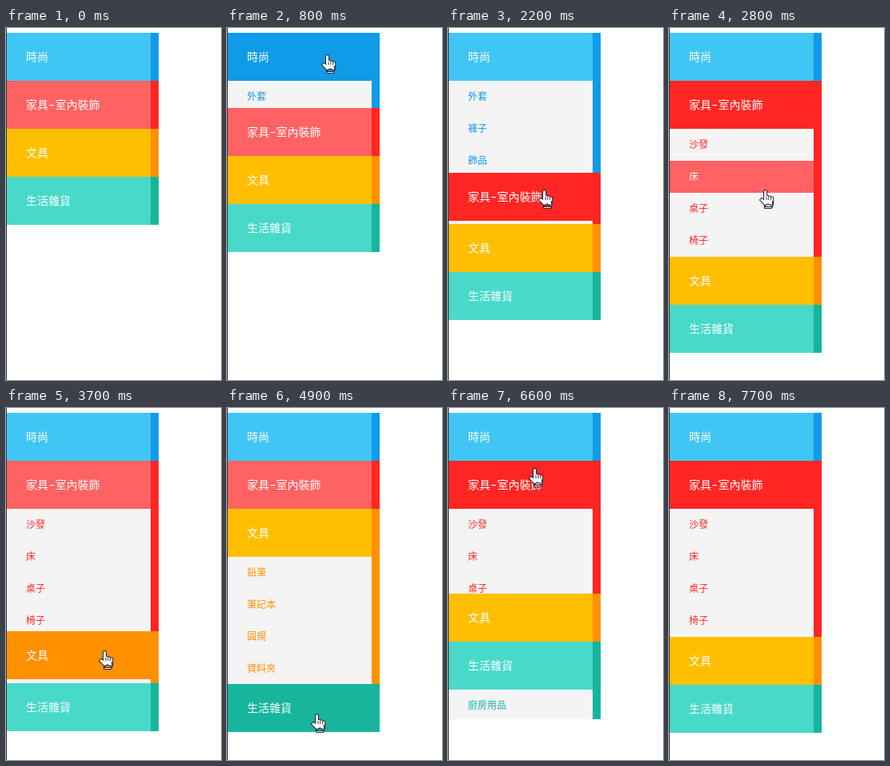
An HTML page with a canvas for the animation above (8300 ms loop, 269x440 px).

```html
<!DOCTYPE html>
<html lang="zh-Hant">
<head>
<meta charset="utf-8">
<title>Accordion menu</title>
<style>
  html, body { margin: 0; width: 100%; height: 100%; overflow: hidden; background: #fff; }
  canvas { display: block; }
</style>
</head>
<body>
<canvas id="stage" width="269" height="440"></canvas>
<script>
const ctx = document.getElementById('stage').getContext('2d');
const LOOP = 8300, STEP = 100, SLIDE = 400, TRAVEL = 500, OPEN_DELAY = 8;
const LEFT = 1, RIGHT = 191, STRIPE = 181, TOP = 6, HEAD = 60, ROW = 40;
const CJK = '"Noto Sans CJK TC", "Noto Sans CJK", sans-serif';
const HEAD_FONT = '300 14px "Noto Sans Mono", ' + CJK;
const ITEM_FONT = '300 12px "Noto Sans", ' + CJK;

const groups = [
  { title: '時尚', light: '#40c6f4', dark: '#0f9be8', items: ['外套', '褲子', '飾品'] },
  { title: '家具–室內裝飾', light: '#ff6262', dark: '#ff2623', items: ['沙發', '床', '桌子', '椅子'] },
  { title: '文具', light: '#ffbf00', dark: '#ff9000', items: ['鉛筆', '筆記本', '圓規', '資料夾'] },
  { title: '生活雜貨', light: '#48d9c8', dark: '#17b59c', items: ['廚房用品', '掃除˙洗滌用品', '浴室˙廁所用品'] }
];

// Where the pointer arrives, and which group it then clicks open.
const stops = [
  { at: 0, x: 290, y: 29 },
  { at: 500, x: 118, y: 33, click: 650, opens: 0 },
  { at: 1500, x: 121, y: 170 },
  { at: 2000, x: 113, y: 202, click: 2150, opens: 1 },
  { at: 3500, x: 116, y: 303, click: 3647, opens: 2 },
  { at: 4700, x: 105, y: 382, click: 4880, opens: 3 },
  { at: 5600, x: 101, y: 257 },
  { at: 6100, x: 101, y: 75, click: 6350, opens: 1 },
  { at: 7600, x: 280, y: 28 }
];

const clamp = v => Math.min(1, Math.max(0, v));
const swing = ms => 0.5 - Math.cos(clamp(ms / SLIDE) * Math.PI) / 2;

function menuState(t) {
  const heights = groups.map(() => 0);
  let active = -1;
  for (const { click, opens } of stops) {
    if (!(click <= t)) continue;
    if (active >= 0) heights[active] *= 1 - swing(t - click);
    heights[opens] = groups[opens].items.length * ROW * swing(t - click - OPEN_DELAY);
    active = opens;
  }
  return { heights: heights.map(Math.round), active };
}

function pointerAt(t) {
  let { x, y } = stops[0];
  for (const stop of stops.slice(1)) {
    const k = clamp((t - stop.at + TRAVEL) / TRAVEL);
    x += (stop.x - x) * k;
    y += (stop.y - y) * k;
  }
  return { x: Math.round(x), y: Math.round(y) };
}

function box(color, x, y, right, height) {
  ctx.fillStyle = color;
  ctx.fillRect(x, y, right - x, height);
}

function label(text, font, color, baseline) {
  ctx.font = font;
  ctx.fillStyle = color;
  ctx.fillText(text, 25, baseline);
}

function handShape() {
  const shape = new Path2D('M1 13L3 11L7 14V23H15L17 18V14L7 19Z');
  shape.roundRect(6, 1, 3, 18, 1.5);
  for (let i = 1; i < 4; i++) shape.roundRect(6 + i * 2.8, 7 + i * 0.8, 2.8, 10, 1.4);
  shape.rect(7, 13, 9, 9);
  return shape;
}

const hand = handShape();
const knuckles = new Path2D('M9 9V13M11.8 9V13M14.6 10V13');
const arrow = new Path2D('M7 1V15L10 12L13 18L15 17L12 11H17Z');

function drawPointer(p, overMenu) {
  const shape = overMenu ? hand : arrow;
  ctx.save();
  ctx.translate(p.x, p.y);
  ctx.lineJoin = 'round';
  ctx.strokeStyle = '#20203a';
  ctx.fillStyle = '#fff';
  ctx.lineWidth = 2;
  ctx.stroke(shape);
  ctx.fill(shape);
  ctx.lineWidth = 0.9;
  if (overMenu) ctx.stroke(knuckles);
  ctx.restore();
}

function draw(t) {
  const { heights, active } = menuState(t);
  const pointer = pointerAt(t);
  const tipX = pointer.x + 6, tipY = pointer.y + 1;
  const hovers = (top, bottom) => tipX >= LEFT && tipX < RIGHT && tipY >= top && tipY < bottom;

  box('#fff', 0, 0, 269, 440);
  box('#3c3848', 0, 0, 1, 440);
  if (active === 3) box('#f7f8fa', LEFT, TOP, RIGHT, 399);

  let y = TOP;
  groups.forEach((group, i) => {
    const lit = i === active || hovers(y, y + HEAD);
    box(lit ? group.dark : group.light, LEFT, y, RIGHT, HEAD);
    box(group.dark, STRIPE, y, RIGHT, HEAD + heights[i]);
    label(group.title, HEAD_FONT, '#fff', y + 35);
    y += HEAD;

    const bottom = y + heights[i];
    ctx.save();
    ctx.beginPath();
    ctx.rect(LEFT, y, STRIPE - LEFT, heights[i]);
    ctx.clip();
    group.items.forEach((item, row) => {
      const top = y + row * ROW;
      const over = hovers(top, Math.min(top + ROW, bottom));
      box(over ? group.light : '#f4f4f4', LEFT, top, STRIPE, ROW);
      label(item, ITEM_FONT, over ? '#fff' : group.dark, top + 24);
    });
    ctx.restore();
    y = bottom;
  });

  drawPointer(pointer, hovers(TOP, y));
}

function frame() {
  const t = performance.now() % LOOP;
  draw(Math.floor(t / STEP) * STEP);
  requestAnimationFrame(frame);
}
frame();
</script>
</body>
</html>
```
